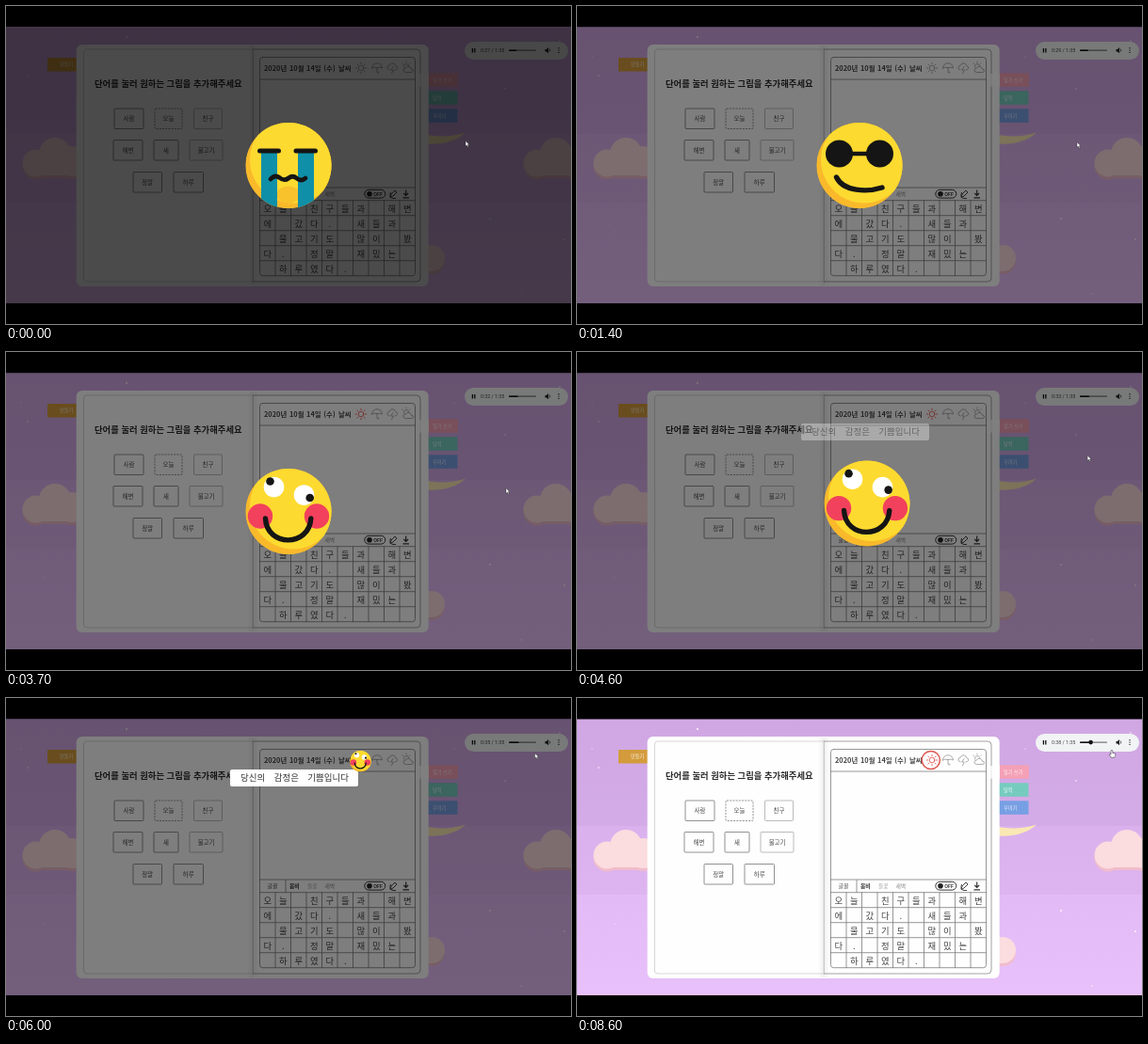
An HTML page that plays this animation: 600 px wide and 338 px high, repeating every 8700 ms.

```html
<!DOCTYPE html>
<html lang="ko">
<head>
<meta charset="utf-8">
<title>Picture diary</title>
<style>
html, body { margin: 0; width: 100%; height: 100%; overflow: hidden; background: #000; }
svg { display: block; width: 600px; height: 338px; }
text { font-family: "Noto Sans CJK KR", "Noto Sans KR", "Noto Sans CJK", "Noto Sans", sans-serif; white-space: pre; }
.ui { font-family: Roboto, sans-serif; }
.hand { font-weight: 300; }
.thin { fill: none; stroke: #7c7c7c; stroke-width: .8; stroke-linecap: round; stroke-linejoin: round; }
.icon { fill: none; stroke: #8c8c8c; stroke-width: .7; stroke-linecap: round; stroke-linejoin: round; }
.ink { fill: none; stroke: #151515; stroke-width: 5.4; stroke-linecap: round; stroke-linejoin: round; }
</style>
</head>
<body>
<svg viewBox="0 0 600 338" width="600" height="338">
  <defs>
    <linearGradient id="sky" x1="0" y1="0" x2="0" y2="1">
      <stop offset="0" stop-color="#d0a7e3"/>
      <stop offset=".385" stop-color="#d3abe7"/>
      <stop offset=".385" stop-color="#dab1ed"/>
      <stop offset=".635" stop-color="#ddb4f0"/>
      <stop offset=".635" stop-color="#e2baf5"/>
      <stop offset="1" stop-color="#e8c0fa"/>
    </linearGradient>
    <linearGradient id="spine">
      <stop offset="0" stop-color="#000" stop-opacity="0"/>
      <stop offset=".5" stop-color="#000" stop-opacity=".06"/>
      <stop offset="1" stop-color="#000" stop-opacity="0"/>
    </linearGradient>
    <clipPath id="disc"><circle r="45.6"/></clipPath>
    <clipPath id="view"><rect y="22.5" width="600" height="293.5"/></clipPath>
  </defs>
  <rect width="600" height="338"/>
  <g clip-path="url(#view)">
    <rect y="22" width="600" height="295" fill="url(#sky)"/>
    <g id="scenery"></g>
    <g id="tabs"></g>
    <g id="book"></g>
    <g id="words"></g>
    <g id="diary"></g>
    <g id="weather"></g>
    <g id="player"></g>
    <rect id="shade" y="22" width="600" height="295"/>
    <g id="popup">
      <rect x="238" y="76" width="136" height="18" rx="2" fill="#fff"/>
      <text class="hand" x="249" y="88" font-size="9.5" word-spacing="6.8" fill="#333">당신의 감정은 기쁨입니다</text>
    </g>
    <g id="face">
      <g clip-path="url(#disc)">
        <circle r="46" fill="#f9b92b"/>
        <circle cx="5" cy="-6" r="46" fill="#fdda30"/>
        <g id="moods"></g>
      </g>
    </g>
    <path id="arrow" d="M0 0V5.4L1.3 4.3L2.3 6.3L3.2 5.9L2.3 3.9H4Z" fill="#fff" stroke="#222" stroke-width=".4"/>
    <path id="pointer" d="M-1 0Q0 -1 .8 0V2.6L3.8 3.4V5.6L2.8 7.4H-.8L-2.8 4.4L-2 3.7L-1 4.4Z" fill="#fff" stroke="#222" stroke-width=".5"/>
  </g>
</svg>
<script>
const LOOP = 8700, STEP = 100;
const $ = id => document.getElementById(id);
const put = (id, html) => { $(id).innerHTML = html; };

const rect = (x, y, w, h, attrs) => `<rect x="${x}" y="${y}" width="${w}" height="${h}" ${attrs}/>`;
const disc = (x, y, r, fill) => `<circle cx="${x}" cy="${y}" r="${r}" fill="${fill}"/>`;
const path = (d, attrs = 'class="thin"') => `<path d="${d}" ${attrs}/>`;
const label = (x, y, size, s, attrs = '') => `<text x="${x}" y="${y}" font-size="${size}" ${attrs}>${s}</text>`;

// Scenery
function cloud(x, y) {
  const puffs = (dy, fill) =>
    [[-20, 2, 14.5], [0, -8, 17], [18, 0, 16], [34, 4, 14]].map(([a, b, r]) => disc(x + a, y + b + dy, r, fill)).join('') +
    rect(x - 20, y + dy, 54, 15, `rx="7" fill="${fill}"`);
  return puffs(3, '#f0bccb') + puffs(0, '#fbdcdf');
}
const stars = [[16, 54], [23, 74], [128, 33], [476, 54], [588, 37], [514, 226], [450, 281], [547, 306], [593, 248], [40, 240], [530, 88]];
put('scenery',
  path('M430 133Q462 143 488 134.5Q474 148 446 146.5L430 144Z', 'fill="#f9e8b4"') +
  cloud(52, 165) + cloud(584, 165) + cloud(418, 264) +
  stars.map(([x, y], i) => disc(x, y, .6 + i % 3 * .2, '#fff4ff')).join(''));

const tab = (x, y, w, fill, s, tx) =>
  rect(x, y, w, 14.5, `fill="${fill}"`) + label(tx, y + 9.3, 5.2, s, 'fill="#fff" fill-opacity=".85"');
put('tabs',
  tab(44, 55, 32, '#d39b3c', '만들기', 57) +
  tab(446, 71.3, 34, '#f4a0b6', '일기 쓰기', 453) +
  tab(446, 90.3, 33.5, '#76cbbf', '달력', 453) +
  tab(446, 109.3, 33.5, '#779fe4', '꾸미기', 453));

// Open book
const edge = (color, width) => `fill="none" stroke="${color}" stroke-width="${width}"`;
put('book',
  rect(74.7, 41, 374, 257, 'rx="6" fill="#fefefe"') +
  rect(256, 42, 12, 255, 'fill="url(#spine)"') +
  path('M262 46H85Q82.5 46 82.5 50V290Q82.5 293 86 293H262', edge('#c4c4c4', .7)) +
  path('M262.3 46V293', edge('#b0b0b0', .8)) +
  path('M262 46H436Q440 46 440 50V289Q440 293 436 293H262', edge('#8c8c8c', .8)) +
  rect(436, 72, 13, 13.5, 'fill="#fff" fill-opacity=".75"') +
  label(94, 86.4, 9.35, '단어를 눌러 원하는 그림을 추가해주세요', 'font-weight="700" fill="#2a2a2a"'));

// Word cards
const cards = [
  ['사람', 115, 109, 31], ['오늘', 158, 109, 29], ['친구', 199.5, 109, 30],
  ['해변', 114, 142.5, 31], ['새', 157, 142.5, 26], ['물고기', 195, 142.5, 35],
  ['정말', 135, 176.5, 30.5], ['하루', 178, 176.5, 31.5]];
put('words', cards.map(([s, x, y, w], i) =>
  rect(x, y, w, 21.5, `rx="1" ${edge(i % 3 == 2 ? '#aaa' : '#777', .8)} ${i == 1 ? 'stroke-dasharray="2 1.2"' : ''}`) +
  label(x + w / 2, y + 13.2, 6.4, s, 'text-anchor="middle" fill="#444"')).join(''));

// Diary page
const lines = ['오늘 친구들과 해변', '에 갔다. 새들과 ', ' 물고기도 많이 봤', '다. 정말 재밌는 ', ' 하루였다.'];
const X0 = 269.5, Y0 = 206.7, CW = 16.5, CH = 16;
let page = rect(X0, 54.5, 165, 232.2, 'rx="3" class="thin"');
for (const y of [78, 193]) page += path(`M${X0} ${y}h165`);
for (let r = 0; r < 5; r++) {
  page += path(`M${X0} ${Y0 + r * CH}h165`);
  [...lines[r]].forEach((c, i) => {
    if (c != ' ') page += label(X0 + CW * (i + .5), Y0 + CH * r + 12.3, 9.4, c, 'text-anchor="middle" class="hand" fill="#444"');
  });
}
for (let i = 1; i < 10; i++) page += path(`M${X0 + i * CW} ${Y0}v80`);
page +=
  label(274, 69.2, 7.4, '2020년 10월 14일 (수)', 'font-weight="700" word-spacing=".6" fill="#444"') +
  label(353, 69.2, 7.4, '날씨', 'font-weight="700" fill="#444"') +
  label(277.5, 202.2, 6, '글꼴', 'fill="#555"') + path('M297 193.5v13') +
  label(301, 202.2, 5.8, '봄비', 'font-weight="700" fill="#333"') +
  label(320, 202.2, 5.8, '들꽃', 'fill="#aaa"') +
  label(338.5, 202.2, 5.8, '새벽', 'fill="#888"') +
  rect(380.8, 195.3, 22, 8.8, `rx="4.4" ${edge('#333', 1)}`) +
  disc(386, 199.7, 2.8, '#222') +
  label(390.3, 201.7, 5.4, 'OFF', 'class="ui" font-weight="500" fill="#222"') +
  path('M408 203.5L409 200L413 196L415 198L411 202ZM408.5 198Q406.5 204 411 204.5H414', edge('#444', 1)) +
  path('M424.7 195.5V201M422.3 199L424.7 201.4L427.1 199M421.5 203.8H428', edge('#333', 1.2));
put('diary', page);

// Weather icons
let rays = '';
for (let i = 0; i < 8; i++) rays += `<path d="M0 -4.3V-5.8" transform="rotate(${i * 45})"/>`;
put('weather',
  `<g id="sun" class="icon" transform="translate(377 66)"><circle r="2.8"/>${rays}</g>` +
  path('M388.5 66Q389 61 394 60.7Q399 61 399.5 66Q397.5 64.5 394 65.6Q390.5 64.5 388.5 66M394 65.6V70Q394 71.5 395.8 71V70' +
    'M407 68Q404.5 67.5 405 65Q405.5 63 407.3 63.2Q408 60.5 410.8 60.8Q413.4 61.2 413.6 63.5Q416 64 415.6 66.3Q415 68 413 68M411 64.5L408.7 68H411.3L409.5 71.8' +
    'M424 70.5Q421.5 70 422 67.8Q422.5 66 424.2 66.3Q425.5 63.7 428 64.4Q430 65 430.2 67Q432.7 67 432.6 69Q432.4 70.5 430.5 70.5ZM422.8 65.3Q421.8 62 425 61.6Q427.2 61.6 427.8 63.6M421 61L421.8 61.7M425 59V60M429 60.8L428.4 61.4', 'class="icon"') +
  `<circle id="ring" cx="375.8" cy="66" r="9.6" ${edge('#e0564f', 1.5)}/>`);

// Audio player
put('player',
  rect(487, 38, 110, 19, 'rx="9.5" fill="#f1f3f4"') +
  path('M495.4 45V49.4M497.8 45V49.4', edge('#111', 1.3)) +
  '<text id="clock" class="ui" x="504" y="49.1" font-size="5.3" fill="#444"></text>' +
  rect(534, 46.5, 29, 1.3, 'rx=".6" fill="#777"') +
  '<rect id="played" x="534" y="46.4" height="1.5" rx=".7" fill="#111"/>' +
  '<circle id="knob" cy="47.1" r="2.3" fill="#111"/>' +
  path('M572.5 45.9H574L576 44V50.2L574 48.4H572.5Z', 'fill="#222"') +
  path('M577 45.4Q578.6 47.1 577 48.8', edge('#222', .7)) +
  [44.8, 47.1, 49.4].map(y => disc(587, y, .7, '#222')).join(''));

// Faces, drawn around their centre
const cry =
  '<ellipse cx="0" cy="31" rx="13" ry="9" fill="#f8c22c"/>' +
  rect(-29, -15, 17, 60, 'fill="#0f90a8"') + rect(10, -15, 17, 60, 'fill="#0f90a8"') +
  path('M-30.5 -15.5H-10.5M8 -15.5H28.5', 'class="ink" style="stroke-width:5"') +
  path('M-19 14.5Q-14.5 9.5 -9.5 13Q-4.5 17 0 13.5Q4.5 10 8.5 13.5Q13.5 17.5 18 13.5', 'class="ink" style="stroke-width:4.8"');
const cool =
  disc(-21.5, -12.5, 14.5, '#151515') + disc(21.5, -12.5, 14.5, '#151515') +
  path('M-20 -12.5H20', 'class="ink" style="stroke-width:4.5"') +
  path('M-24.5 12.5C-17 28 8 28.5 24 23.5', 'class="ink"');
const joy =
  disc(-30, 5, 13.2, '#f2415c') + disc(30, 5, 13.2, '#f2415c') +
  disc(-15.5, -26, 10.8, '#fff') + disc(-19.5, -32, 4.3, '#151515') +
  disc(16.5, -17.5, 10.8, '#fff') + disc(22.7, -14.5, 4.3, '#151515') +
  path('M-24.5 7.5C-23 38 22 38 23.8 7.5', 'class="ink"');
put('moods', [cry, cool, joy].map(m => `<g>${m}</g>`).join(''));
const moods = [...$('moods').children];

// Motion: each key is a time followed by its values
const cursorKeys = [[0, 488, 143.5], [500, 522.5, 146.5], [900, 531, 144.8], [4200, 531, 144.8], [5100, 556, 66.5], [6200, 563, 57], [7600, 565, 55.8], [8600, 568, 55.8]];
const faceKeys = [[4500, 300, 169.5, 1], [5100, 348, 119, .985], [5400, 366, 89, .6], [5700, 374.5, 71, .32], [6100, 377, 66, .225]];
const shadeKeys = [[0, .7], [300, .5], [7600, .5], [8200, 0]];
const popupKeys = [[4500, 0], [4800, 1], [7600, 1], [8200, 0]];

function at(keys, t) {
  let i = keys.findIndex(k => k[0] > t);
  if (i < 0) i = keys.length;
  const a = keys[Math.max(i - 1, 0)], b = keys[Math.min(i, keys.length - 1)];
  const u = b[0] > a[0] ? (t - a[0]) / (b[0] - a[0]) : 0;
  return a.slice(1).map((v, j) => v + (b[j + 1] - v) * u);
}

const set = (id, name, v) => $(id).setAttribute(name, v);
const show = (id, on) => set(id, 'visibility', on ? 'visible' : 'hidden');

function draw(now) {
  const t = Math.floor(now % LOOP / STEP) * STEP;

  const mood = Math.min(Math.floor(t / 200), 17) % 3;
  moods.forEach((m, i) => m.setAttribute('visibility', i == mood ? 'inherit' : 'hidden'));
  const [x, y, s] = at(faceKeys, t);
  set('face', 'transform', `translate(${x} ${y}) scale(${s})`);
  const fade = at(shadeKeys, t)[0];
  set('face', 'opacity', Math.min(1, fade * 2));
  set('shade', 'opacity', fade);
  set('popup', 'opacity', at(popupKeys, t)[0]);

  $('sun').style.stroke = t >= 3400 ? '#e03a35' : '#8c8c8c';
  show('ring', t >= 7700);

  const sec = 27 + Math.floor((t + 700) / 800);
  $('clock').textContent = `0:${sec} / 1:35`;
  const w = sec / 95 * 29;
  set('played', 'width', w);
  set('knob', 'cx', 534 + w);
  show('knob', t >= 8000);

  const [cx, cy] = at(cursorKeys, t);
  for (const id of ['arrow', 'pointer']) set(id, 'transform', `translate(${cx} ${cy})`);
  show('arrow', t < 8000);
  show('pointer', t >= 8000);
}

const start = performance.now();
function tick() {
  draw(performance.now() - start);
  requestAnimationFrame(tick);
}
tick();
</script>
</body>
</html>
```
